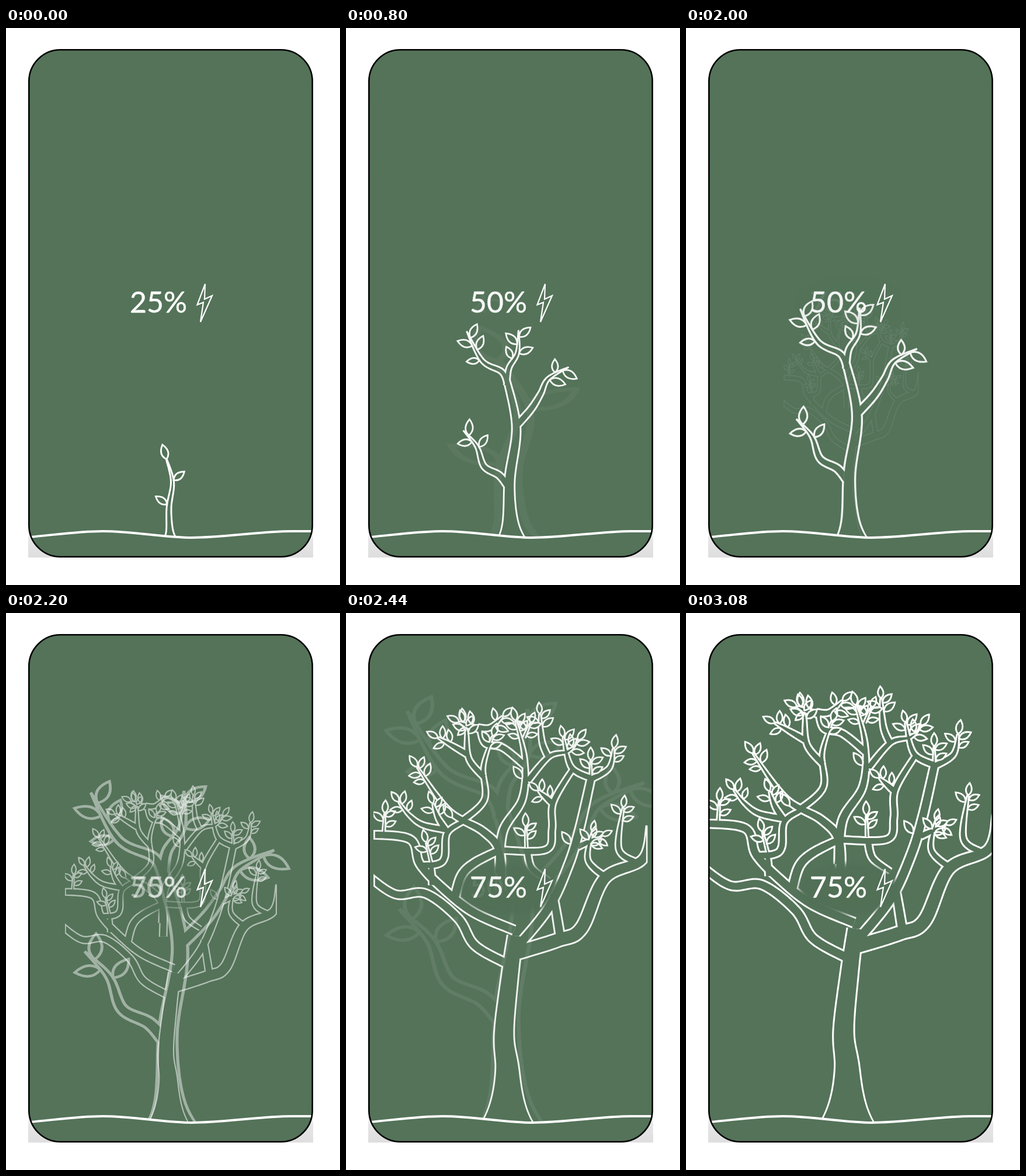
An HTML page for the animation above (4 s loop, 572 by 953 pixels).

```html
<!DOCTYPE html>
<html lang="en">
<head>
<meta charset="utf-8">
<title>Charging tree</title>
<style>
  html, body { margin: 0; width: 100%; height: 100%; overflow: hidden; background: #fff; }
  svg { display: block; width: 572px; height: 953px; }
  text { font: 400 50px Lato, Inter, sans-serif; fill: #fff; stroke: #fff; stroke-width: .5px; }
  .line { fill: none; stroke: #fff; stroke-miterlimit: 6; }
</style>
</head>
<body>
<svg viewBox="0 0 572 953">
  <defs id="defs">
    <linearGradient id="shade" x1="0" y1="0" x2="0" y2="1">
      <stop offset="0" stop-color="#fff"/>
      <stop offset=".35" stop-color="#e6e6e6"/>
      <stop offset="1" stop-color="#dedede"/>
    </linearGradient>
    <filter id="soft" x="-30%" y="-50%" width="160%" height="200%"><feGaussianBlur stdDeviation="5"/></filter>
    <clipPath id="screen"><rect x="39" y="37" width="486" height="868" rx="54"/></clipPath>
    <clipPath id="sky"><path d="M40 871C85 867 125 861 165 861C220 861 270 872 318 872C370 872 440 861 488 861H526V0H40Z"/></clipPath>
  </defs>
  <rect x="38" y="858" width="488" height="48" fill="url(#shade)"/>
  <rect x="39" y="37" width="486" height="868" rx="54" fill="#547359"/>
  <g clip-path="url(#screen)">
    <g id="trees" clip-path="url(#sky)"></g>
    <ellipse id="haze" cx="279" cy="472" rx="86" ry="44" fill="#517056" filter="url(#soft)"/>
    <path class="line" stroke-width="4" d="M40 871C85 867 125 861 165 861C220 861 270 872 318 872C370 872 440 861 488 861H526"/>
  </g>
  <g id="labels"></g>
  <path class="line" stroke-width="2.2" d="M341 438L327.5 473.5L338 469.5L333 503L353 458L340 464Z"/>
  <rect x="39.3" y="37.3" width="485.4" height="867.4" rx="54" fill="none" stroke="#000" stroke-width="2.6"/>
</svg>
<script>
const LOOP = 4000, STEP = 40, LINE = 3;

// A tree is groups of limbs. Each limb is a centre line through a few points,
// tapering between the two widths of its group and ending in a spray of leaves.
const stages = [
  {
    label: '25%', box: [257, 711, 303, 870], margin: 20, leafSize: 24, leafGap: 40, flare: 11,
    groups: [{ width: [9, 1], leaves: 3, limbs: '281,872 279,822 285,777 275,738' }]
  },
  {
    label: '50%', box: [179, 500, 387, 870.5], margin: 20, leafSize: 26, leafGap: 14, flare: 29,
    groups: [
      { width: [19, 11], limbs: '283,872 280,775 292,680 275,595' },
      { width: [13, 0], leaves: 3, limbs: `
        279,785 262,763 235,747 222,712 198,684
        293,675 318,647 335,620 349,593 385,573` },
      { width: [10, 0], leaves: 4, limbs: `
        276,602 266,581 232,562 204,510
        275,605 279,575 294,548 296,508` }
    ]
  },
  {
    label: '75%', box: [38, 120, 525.5, 870], margin: 1.5, leafSize: 22, leafGap: 8, flare: 58,
    groups: [
      { width: [36, 28], limbs: '276,873 276,780 270,715 280,615 290,540' },
      { width: [26, 15], limbs: '283,573 365,548 408,527 450,438 518,404 532,345' },
      { width: [17, 14], limbs: `
        276,590 218,557 188,509 130,465 75,466 20,428
        288,530 215,498 160,455 120,413 101,368 20,360
        182,472 194,433 218,410 264,387
        371,545 358,465` },
      { width: [18, 15], bud: true, limbs: '292,562 350,490 385,415 405,350 426,258' },
      { width: [17, 3], leaves: 5, bud: true, limbs: `
        264,460 262,390 232,354 172,318 115,240
        262,430 268,355 303,296 307,225 291,158` },
      { width: [13, 10], limbs: `
        116,415 150,413 164,400 168,358 195,338
        142,450 140,415
        266,388 345,387 356,350 358,303 392,245
        308,238 268,206 236,198 226,168
        312,392 320,420 350,442` },
      { width: [12, 3], leaves: 4, limbs: `
        168,352 125,343 100,325 82,302
        166,352 152,330 143,305
        195,336 235,298 233,240 250,185
        234,258 207,225 203,178 198,160
        205,218 165,195 152,188
        228,174 205,167 190,160
        224,170 245,170 268,150
        310,268 350,222 385,212 402,192
        350,224 338,195 334,146
        357,305 331,282
        452,436 420,405 428,355
        505,409 475,385 483,312
        425,262 458,242 466,207
        425,260 390,240 376,187
        402,382 445,362` },
      { width: [5, 2], leaves: 4, limbs: `
        140,410 131,374
        55,356 57,322
        310,383 309,346
        425,262 425,228
        306,188 317,162` }
    ]
  }
];
const changes = [{ start: 364, length: 520 }, { start: 1971, length: 600 }];

function seeded(seed) {
  return () => (seed = (seed * 16807) % 2147483647) / 2147483647;
}

// Samples a Catmull-Rom curve; each sample knows its heading and distance from the root.
function sample(points, perSpan = 14) {
  const at = i => points[Math.max(0, Math.min(points.length - 1, i))];
  const out = [];
  for (let n = 0; n <= (points.length - 1) * perSpan; n++) {
    const i = Math.min(Math.floor(n / perSpan), points.length - 2), t = n / perSpan - i;
    const [x, y] = [0, 1].map(k => {
      const [a, b, c, d] = [at(i - 1)[k], at(i)[k], at(i + 1)[k], at(i + 2)[k]];
      return b + t * ((c - a) + t * ((2 * a - 5 * b + 4 * c - d) + t * (3 * b - a - 3 * c + d))) / 2;
    });
    const last = out[n - 1];
    out.push({ x, y, distance: last ? last.distance + Math.hypot(x - last.x, y - last.y) : 0 });
  }
  out.forEach((p, n) => {
    const a = out[Math.max(0, n - 1)], b = out[Math.min(out.length - 1, n + 1)];
    p.heading = Math.atan2(b.y - a.y, b.x - a.x);
  });
  return out;
}

function beside(p, offset) {
  return [p.x - Math.sin(p.heading) * offset, p.y + Math.cos(p.heading) * offset];
}

function ribbon(curve, extra) {
  const edge = side => curve.map(p => beside(p, side * Math.max(0, p.width + extra) / 2));
  return 'M' + [...edge(1), ...edge(-1).reverse()].map(p => p.map(v => v.toFixed(1))).join('L') + 'Z';
}

function leaf([x, y], angle, size) {
  const point = (along, across) => [
    x + size * (along * Math.cos(angle) - across * Math.sin(angle)),
    y + size * (along * Math.sin(angle) + across * Math.cos(angle))
  ];
  return `M${[x, y]}Q${point(.42, .46)} ${point(1, 0)}Q${point(.42, -.46)} ${[x, y]}Z`;
}

function grow(tree) {
  const random = seeded(75);
  const shape = { outer: '', inner: '', leaves: '' };
  tree.groups.forEach((group, index) => {
    const [root, tip] = group.width;
    for (const limb of group.limbs.trim().split('\n')) {
      const curve = sample(limb.trim().split(' ').map(p => p.split(',').map(Number)));
      const length = curve[curve.length - 1].distance;
      const flare = index ? 0 : tree.flare;
      for (const p of curve) {
        p.width = tip + (root - tip) * (1 - (p.distance / length) ** 2);
        if (flare) p.width += flare * Math.exp(-p.distance / (flare * .8));
      }
      shape.outer += ribbon(curve, LINE);
      shape.inner += ribbon(curve, -LINE);

      const near = distance => curve.find(p => p.distance >= Math.max(0, distance) - .01);
      // Pointed limbs have no leaf at the very tip.
      const first = tip ? 0 : 1;
      for (let k = first; k < first + (group.leaves || 0); k++) {
        const p = near(length - k * tree.leafGap), side = k ? (k % 2 ? 1 : -1) : 0;
        const angle = p.heading + side * (.95 + .3 * (random() - .5));
        shape.leaves += leaf(beside(p, side * p.width / 2), angle, tree.leafSize * (.88 + .24 * random()));
      }
      if (group.bud) {
        const p = near(length * .62);
        shape.leaves += leaf(beside(p, -p.width / 2), -2.2, tree.leafSize * 1.2);
      }
    }
  });
  return shape;
}

function add(parent, name, attributes) {
  const node = document.createElementNS('http://www.w3.org/2000/svg', name);
  for (const key in attributes) node.setAttribute(key, attributes[key]);
  return parent.appendChild(node);
}

const [defs, trees, labels, haze] = ['defs', 'trees', 'labels', 'haze'].map(id => document.getElementById(id));

function frame([x0, y0, x1, y1], margin) {
  return { x: x0 - margin, y: y0 - 20, width: x1 - x0 + 2 * margin, height: y1 - y0 + 40 };
}

// The inner shapes are cut out of the outer ones, so limbs merge into one outline.
stages.forEach((stage, i) => {
  const shape = grow(stage), area = frame(stage.box, stage.margin);
  const inside = add(defs, 'clipPath', { id: 'inside' + i });
  add(inside, 'rect', frame(stage.box, stage.margin - LINE));
  const mask = add(defs, 'mask', { id: 'outline' + i, maskUnits: 'userSpaceOnUse', ...area });
  add(mask, 'path', { d: shape.outer, fill: '#fff' });
  add(mask, 'path', { d: shape.inner, fill: '#000', 'clip-path': `url(#inside${i})` });
  add(mask, 'path', { d: shape.leaves, fill: '#000', stroke: '#fff', 'stroke-width': LINE - .2 });
  stage.tree = add(trees, 'g', {});
  add(stage.tree, 'rect', { ...area, fill: '#fff', mask: `url(#outline${i})` });
  stage.text = add(labels, 'text', { x: 212, y: 487 });
  stage.text.textContent = stage.label;
});

// cubic-bezier(0, 0, .58, 1)
function easeOut(x) {
  if (x <= 0) return 0;
  if (x >= 1) return 1;
  let low = 0, high = 1;
  for (let i = 0; i < 24; i++) {
    const s = (low + high) / 2;
    if (1.74 * (1 - s) * s * s + s ** 3 < x) low = s; else high = s;
  }
  return low * low * (3 - 2 * low);
}

function fit([x0, y0, x1, y1], [u0, v0, u1, v1]) {
  const sx = (u1 - u0) / (x1 - x0), sy = (v1 - v0) / (y1 - y0);
  return `matrix(${sx} 0 0 ${sy} ${u0 - x0 * sx} ${v0 - y0 * sy})`;
}

function draw(time) {
  const t = Math.floor(time % LOOP / STEP) * STEP;
  const [first, second] = changes.map(c => easeOut((t - c.start) / c.length));
  const from = second > 0 ? 1 : 0, p = second > 0 ? second : first;
  const box = stages[from].box.map((v, i) => v + (stages[from + 1].box[i] - v) * p);
  stages.forEach((stage, i) => {
    const opacity = i === from ? 1 - p : i === from + 1 ? p : 0;
    stage.tree.setAttribute('transform', fit(stage.box, box));
    stage.tree.setAttribute('opacity', opacity);
    stage.text.setAttribute('opacity', opacity);
  });
  haze.setAttribute('opacity', second);
}

const begin = performance.now();
function tick() {
  draw(performance.now() - begin);
  requestAnimationFrame(tick);
}
tick();
</script>
</body>
</html>
```
